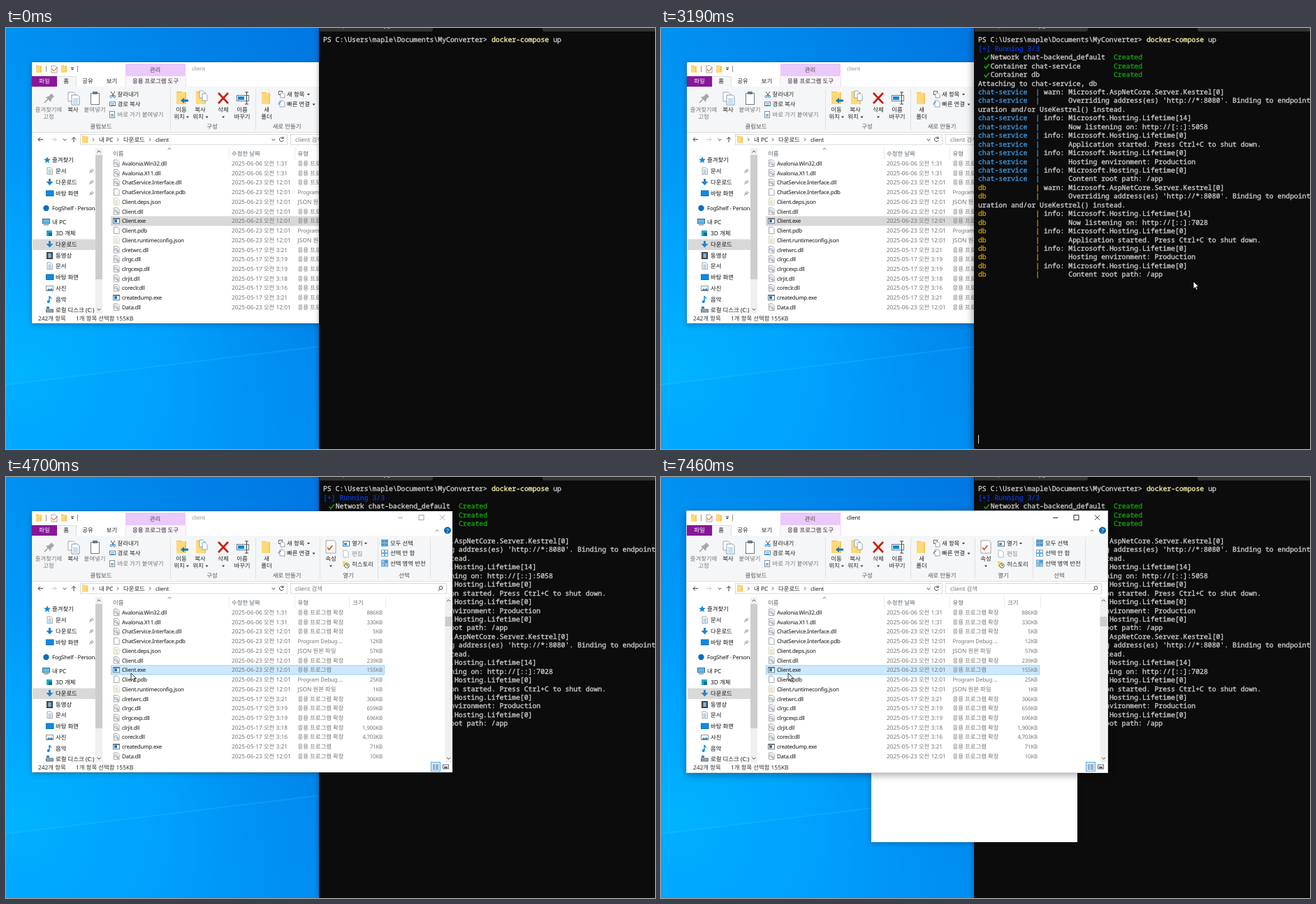
An HTML page for the animation above (8 s loop, 929 by 603 pixels).

```html
<!DOCTYPE html>
<html lang="ko">
<head>
<meta charset="utf-8">
<style>
html,body{margin:0;width:100%;height:100%;overflow:hidden}
#stage{position:relative;width:929px;height:603px;overflow:hidden;background:#0a8ff0}
#stage>*{position:absolute}
svg{display:block;position:absolute;left:0;top:0}
text{white-space:pre;text-rendering:geometricPrecision}
.k,.l{font-family:'Noto Sans','Noto Sans CJK KR',sans-serif;font-size:8.4px}
.l{font-size:7.9px;letter-spacing:-.2px}
.m{font:9.797px 'Noto Sans Mono','DejaVu Sans Mono',monospace;fill:currentColor;stroke:currentColor;stroke-width:.35px}
</style>
</head>
<body>
<div id="stage"></div>
<script>
const stage = document.getElementById('stage');

// ---- drawing helpers: each returns SVG markup ----
const rect = (x, y, w, h, fill, stroke = 'none') =>
  `<rect x="${x}" y="${y}" width="${w}" height="${h}" fill="${fill}" stroke="${stroke}"/>`;
const path = (d, stroke = '#444', w = 1, fill = 'none') =>
  `<path d="${d}" stroke="${stroke}" stroke-width="${w}" fill="${fill}"/>`;
const disc = (x, y, r, fill, stroke = 'none') =>
  `<circle cx="${x}" cy="${y}" r="${r}" fill="${fill}" stroke="${stroke}"/>`;
const text = (x, y, s, fill = '#222', cls = 'k', anchor = 'start') =>
  `<text x="${x}" y="${y + 3}" fill="${fill}" class="${cls}" text-anchor="${anchor}">${s}</text>`;
const mid = (x, y, s, fill) => text(x, y, s, fill, 'k', 'middle');
const group = (id, body) => `<g id="${id}">${body}</g>`;
const clip = (id, x, y, w, h, body) =>
  `<clipPath id="${id}">${rect(x, y, w, h, '#000')}</clipPath><g clip-path="url(#${id})">${body}</g>`;

const folder = (x, y, w = 8, h = 10) =>
  rect(x, y, w * .55, h, '#f2bd45') + rect(x, y + 1, w, h - 1, '#ffd978') + rect(x + w - 2, y + 1, 2, h - 1, '#f6c85a');
const page = (x, y, w = 8, h = 10, line = '#8a8f96') =>
  path(`M${x} ${y}h${w - 2.5}l2.5 2.5v${h - 2.5}h${-w}z`, line, .8, '#fff');
const down = (x, y) => path(`M${x - 2} ${y - 1}h4l-2 2.4z`, 'none', 0, '#333');
const chev = (x, y, dir = 1, c = '#444') => path(`M${x - 2.4} ${y - 1.2 * dir}l2.4 ${2.4 * dir} 2.4 ${-2.4 * dir}`, c);
const next = x => path(`M${x - 1} 157.5l2 2.2-2 2.2`, '#555');
const tick = (x, y, c, w = 1.3) => path(`M${x} ${y}l2.5 3 5-6`, c, w);
const lines = (x, y, w, n, c) => Array.from({length: n}, (_, i) => rect(x, y + 2 * i, w, .8, c)).join('');

function layer(id, x, y, w, h, body) {
  const d = document.createElement('div');
  d.id = id;
  d.style.cssText = `left:${x}px;top:${y}px;width:${w}px;height:${h}px`;
  d.innerHTML = `<svg width="${w}" height="${h}" viewBox="${x} ${y} ${w} ${h}">${body}</svg>`;
  stage.append(d);
  return d;
}
const $ = id => document.getElementById(id);
const show = (id, on) => $(id).style.display = on ? '' : 'none';

// ---- desktop ----
layer('desk', 0, 0, 929, 603, `
<linearGradient id="sky" x1="0" y1=".2" x2=".52" y2="0"><stop stop-color="#0096f4"/><stop offset="1" stop-color="#0074e0"/></linearGradient>
<radialGradient id="glow" gradientUnits="userSpaceOnUse" cx="20" cy="500" r="430"><stop stop-color="#00b4ff"/><stop offset=".5" stop-color="#00a6ff" stop-opacity=".75"/><stop offset="1" stop-color="#0090f5" stop-opacity="0"/></radialGradient>
${rect(0, 0, 929, 603, 'url(#sky)')}${rect(0, 0, 929, 603, 'url(#glow)')}
${path('M0 511L449 456V603H0z', 'none', 0, 'rgba(0,150,255,.16)')}${path('M0 511L449 456', 'rgba(120,215,255,.16)', 1.5)}`);

// ---- file window ----
const gray = '#777';
const rowY = i => 194 + 13.73 * i;
const kinds = {dll: '응용 프로그램 확장', pdb: 'Program Debug ...', json: 'JSON 원본 파일', exe: '응용 프로그램'};
const files = `Avalonia.Win32.dll 06-06 1:31 886
Avalonia.X11.dll 06-06 1:31 330
ChatService.Interface.dll 06-23 12:01 5
ChatService.Interface.pdb 06-23 12:01 12
Client.deps.json 06-23 12:01 57
Client.dll 06-23 12:01 239
Client.exe 06-23 12:01 155
Client.pdb 06-23 12:01 25
Client.runtimeconfig.json 06-23 12:01 1
clretwrc.dll 05-17 3:21 306
clrgc.dll 05-17 3:19 659
clrgcexp.dll 05-17 3:19 696
clrjit.dll 05-17 3:18 1,900
coreclr.dll 05-17 3:16 4,703
createdump.exe 05-17 3:21 71
Data.dll 06-23 12:01 10`.split('\n').map(s => s.split(' '));

function fileIcon(ext, y) {
  if (ext === 'exe') return rect(153.5, y - 3.5, 9, 7, '#fff', '#777') + rect(155, y - 2, 4, 4, '#0a78d4') + rect(153, y - 4, 10, 1.5, '#666');
  let s = page(154.5, y - 5, 7.5, 9.5, ext === 'json' ? '#c8bfa5' : '#8a8f96');
  if (ext === 'json') s += lines(156, y - 2, 4, 3, '#cbb98a');
  if (ext === 'dll') s += disc(157.5, y - .5, 1.7, '#fff', '#8c959e') + disc(160, y + 2, 1, '#fff', '#8c959e');
  return s;
}
const fileRow = ([name, day, time, size], i) => {
  const y = rowY(i), ext = name.split('.').pop();
  return fileIcon(ext, y) + text(166, y, name, '#111', 'l') + text(323, y, `2025-${day} 오전 ${time}`, gray) +
    text(417.5, y, kinds[ext], gray, ext === 'pdb' ? 'l' : 'k') + text(539, y, size + 'KB', gray, 'l', 'end');
};

const blue = '#1688d8';
const navIcon = {
  star: y => path(`M59 ${y - 5}l1.4 3.4 3.6.3-2.8 2.3.9 3.6-3.1-2-3.1 2 .9-3.6-2.8-2.3 3.6-.3z`, 'none', 0, blue),
  doc: y => page(59, y - 5, 7.5, 9.5) + lines(60.5, y - 2, 4.5, 3, '#4a94c8'),
  down: y => path(`M61 ${y - 5}h3v4h3.5l-5 5.5-5-5.5h3.5z`, 'none', 0, '#2583c9'),
  desk: y => rect(57.5, y - 4, 10.5, 7.5, '#0a8be8', '#0870bd'),
  cloud: y => disc(57.5, y, 4.2, '#0a6fc2'),
  pc: y => rect(52.5, y - 4.5, 10, 6.5, '#58bdf0', '#4d6b80') + rect(54, y + 3.5, 7, 1, '#4d6b80'),
  cube: y => rect(58, y - 4, 8, 8, '#25a8c8') + rect(61, y - 1, 5, 5, '#0c6f9c'),
  film: y => rect(58.5, y - 4.5, 8, 9, '#4c5c6c', '#333') + rect(60.5, y - 3, 4, 6, '#86b6d8'),
  photo: y => rect(57.5, y - 3.5, 10, 7, '#fff', '#8a99a5') + path(`M58 ${y + 3}l3-3 2 1.5 2-2 2.5 3.5z`, 'none', 0, '#3485b5'),
  note: y => path(`M62 ${y + 3}v-8q1 2 3 3.5`, '#0a86e0', 1.4) + disc(60.7, y + 3, 1.9, '#0a86e0'),
  disk: y => rect(57.5, y - 1, 10, 4, '#9aa5ad', '#66727a') + rect(58, y - 5, 4, 3, blue)
};
const nav = [['star', 189, '즐겨찾기', 1], ['doc', 205, '문서'], ['down', 221, '다운로드'], ['desk', 237, '바탕 화면'],
  ['cloud', 258, 'FogShelf - Personal', 1], ['pc', 278, '내 PC', 1], ['cube', 294, '3D 개체'], ['down', 310, '다운로드'],
  ['film', 326, '동영상'], ['doc', 341, '문서'], ['desk', 357, '바탕 화면'], ['photo', 373, '사진'], ['note', 389, '음악'], ['disk', 404, '로컬 디스크 (C:)']]
  .map(([i, y, s, top]) => navIcon[i](y) + text(top ? 66 : 71, y, s, '#111', i === 'cloud' ? 'l' : 'k')).join('');
const pushpins = [205, 221, 237].map(y => path(`M119 ${y + 3}l2.5-2.5m-1.5-1.5l3 3m-1.5-3.2l2 2 1.5-2-1.5-1.5z`, '#888', 1)).join('');

const caption = (x, y) => path(`M${x - 3.5} ${y + .5}h7M${x + 26.5} ${y - 3.5}h7v7h-7zM${x + 56.5} ${y - 3.5}l7 7m0-7l-7 7`, 'currentColor', .9);

const titleBar = rect(37, 49, 602, 36, '#fff') + folder(43, 53.5) + rect(57, 54, .8, 9, '#777') +
  page(65, 54) + tick(66, 59, '#c33d1c', 1) + folder(79, 53.5) + down(95, 59) + rect(92.8, 56, 4.4, .8, '#333') + rect(102, 54, .8, 9, '#777') +
  rect(171, 51, 86, 18, '#ebc9fb') + mid(213.5, 59.5, '관리', '#444') +
  `<g id="title">${text(266, 58, 'client', 'currentColor', 'l')}${caption(564.5, 58)}</g>` +
  rect(171, 69, 86, 15, '#fbf5fd') + rect(170.5, 69, .7, 15, '#e3d5e8') + rect(257, 69, .7, 15, '#e3d5e8') +
  rect(37, 69, 36, 15, '#881798') + mid(55, 76, '파일', '#fff') + rect(73.5, 69.5, 27, 16, '#f5f6f7', '#dddee0') +
  mid(86, 76, '홈') + mid(117, 76, '공유') + mid(151.5, 76, '보기') + mid(214, 76, '응용 프로그램 도구') +
  chev(617, 77, -1, '#777') + disc(632, 76.5, 5, '#0a67b5') + mid(632, 76.5, '?', '#fff');

const ribbon = rect(37, 84, 602, 65, '#f5f6f7') + rect(37, 149, 602, .8, '#d5d7d9') +
  [235, 357, 449, 532, 607].map(x => rect(x, 87, .8, 59, '#dcdddf')).join('') +
  [[136, '클립보드'], [295, '구성'], [402, '새로 만들기'], [490, '열기'], [570, '선택']].map(([x, s]) => mid(x, 141, s, '#555')).join('') +
  path('M55 107l5-5', '#8d949a', 1.3) + path('M57 99l7 7 1-4 4-4-4-4-4 4z', 'none', 0, '#a2a8ad') +
  mid(61, 117, '즐겨찾기에', gray) + mid(61, 127, '고정', gray) +
  page(89, 92, 10, 13) + page(94, 96, 11, 14, '#5b88ad') + lines(96, 101, 7, 4, '#7fb2d8') + mid(96, 117, '복사') +
  rect(121.5, 93.5, 12, 16, '#fff', '#6d7c88') + rect(124, 91, 7, 4, '#6d7c88') + mid(127, 117, '붙여넣기', gray) +
  path('M150 91l4 6m2-6l-4 6', '#555') + disc(150.5, 98, 1.5, 'none', blue) + disc(155, 98, 1.5, 'none', blue) + text(159.5, 95, '잘라내기') +
  rect(148.5, 106, 8, 5.5, '#fff', '#57809c') + lines(150, 108, 5, 2, blue) + text(159.5, 109, '경로 복사') +
  rect(148.5, 119.5, 7, 9, '#fff', '#7e8e9a') + rect(150, 123, 4, 4, '#91b6d0') + text(159.5, 123.5, '바로 가기 붙여넣기', gray) +
  folder(244, 91, 14, 18) + path('M250 104l5-4v2.5h6v3h-6v2.5z', 'none', 0, '#1577c2') + mid(251, 117, '이동') + mid(248, 127, '위치') + down(260, 127.5) +
  folder(272, 91, 14, 18) + page(277, 90, 7, 10, '#6b98b8') + page(281, 94, 7, 10, '#6b98b8') + mid(278, 117, '복사') + mid(275, 127, '위치') + down(287.5, 127.5) +
  path('M304 93l14 15m0-15l-14 15', '#c5200f', 2.6) + mid(311, 117, '삭제') + down(311, 127.5) +
  rect(330.5, 96.5, 17, 8, '#fff', '#62798a') + rect(332, 98, 9, 5, blue) + path('M342 92h5m-2.5 0v17m-2.5 0h5', '#444') + mid(338, 117, '이름') + mid(338, 127, '바꾸기') +
  folder(366, 92, 12, 17) + mid(373, 117, '새') + mid(373, 127, '폴더') +
  rect(390.5, 90.5, 5, 5, '#fff', '#667') + page(393, 93, 6, 7) + text(402, 95, '새 항목') + down(433, 95) +
  page(392, 104, 7, 9) + path('M390 110q0-4 4-4', blue) + text(402, 109, '빠른 연결') + down(440.5, 109.5) +
  page(458, 91, 14, 18) + tick(460, 101, '#d2561d', 1.8) + mid(465, 117, '속성') + down(465, 127.5) +
  rect(482.5, 92, 9, 7, '#fff', '#567') + rect(484, 94.5, 4, 3, blue) + text(495, 95, '열기') + down(515, 95) +
  page(483, 105, 7, 10, '#aaa') + text(495, 110, '편집', '#888') +
  folder(482, 121, 6, 7) + disc(488, 127, 3.3, '#fff', '#3a7a35') + path('M488 125v2h1.5', '#333') + text(495, 125, '히스토리') +
  [[94.5, '모두 선택', '#359be0'], [109, '선택 안 함', '#fff'], [123.5, '선택 영역 반전', '#9fd0f0']].map(([y, s, f]) =>
    [0, 1, 2, 3].map(i => rect(537.5 + i % 2 * 5, y - 4.5 + (i >> 1) * 5, 4, 4, i === 1 && f === '#9fd0f0' ? '#359be0' : f, '#6ea7d0')).join('') + text(550, y, s)).join('');

const address = path('M53 159.7h-7m3-3l-3 3 3 3', '#333') + path('M65 159.7h7m-3-3l3 3-3 3', '#c8c8c8') + chev(84, 160) + path('M97 163.5v-7m-3 3l3-3 3 3', '#333') +
  rect(106.5, 152.5, 296, 14.5, '#fff', '#d9d9d9') + folder(109, 154.5) + next(125) + text(133, 159.5, '내 PC') + next(160) +
  text(168, 159.5, '다운로드') + next(206) + text(214, 159.5, 'client', '#222', 'l') + chev(383, 160) + path('M397 158a3 3 0 1 0 .3 2.5m-.3-5v2.8h-2.7', '#444') +
  rect(407.5, 152.5, 223, 14.5, '#fff', '#d9d9d9') + text(414, 159.5, 'client 검색', gray) + disc(622.5, 158.7, 2.3, 'none', '#444') + path('M621 160.5l-2.5 2.7', '#444');

const headers = [[153, '이름'], [323, '수정한 날짜'], [417.5, '유형'], [496, '크기']].map(([x, s]) => text(x, 180, s, '#5a6675')).join('') +
  [319, 413, 491, 543].map(x => rect(x, 171, .8, 17, '#e5e5e5')).join('') + chev(234, 173, -1, '#777');

const scroll = (x, y, h) => rect(x, 172, 10, 237, '#f0f0f0') + rect(x, y, 10, h, '#cdcdcd') + chev(x + 5, 177, -1) + chev(x + 5, 403);

const explorer = layer('explorer', 37, 49, 602, 374,
  rect(37, 49, 602, 374, '#fff') + titleBar + ribbon + address + headers +
  rect(38, 302.5, 90, 15.5, '#d9d9d9') + clip('navclip', 37, 170, 91, 239, nav + pushpins) + scroll(128, 182, 178) +
  group('hover', rect(151, rowY(7) - 6.8, 391, 13.6, '#e5f3ff')) +
  `<rect id="pick" x="150.5" y="${rowY(6) - 6.4}" width="391" height="13"/>` +
  files.map(fileRow).join('') + scroll(628.5, 200, 14) +
  text(46, 415.5, '242개 항목', '#333') + text(100, 415.5, '1개 항목 선택함 155KB', '#333') +
  rect(608.5, 408.5, 13, 13, '#cce8ff', '#5cb0e8') + lines(611, 412, 3, 4, '#557') + lines(615, 412, 4, 4, '#557') +
  rect(625.5, 412, 8, 6, '#fff', '#667') + rect(627, 414.5, 5, 3, '#567'));

// ---- terminal ----
const CH = 5.878, LH = 12.44;
const at = (row, col, s, c = '#ccc') => `<text class="m" x="${454 + CH * col}" y="${17 + LH * row + 3.4}" style="color:${c}">${s}</text>`;
const log = (name, color, port, top) => {
  const msg = ['warn: Microsoft.AspNetCore.Server.Kestrel[0]', "      Overriding address(es) 'http://*:8080'. Binding to endpoints",
    null, 'info: Microsoft.Hosting.Lifetime[14]', `      Now listening on: http://[::]:${port}`, 'info: Microsoft.Hosting.Lifetime[0]',
    '      Application started. Press Ctrl+C to shut down.', 'info: Microsoft.Hosting.Lifetime[0]', '      Hosting environment: Production',
    'info: Microsoft.Hosting.Lifetime[0]', '      Content root path: /app'];
  return msg.map((s, i) => s === null ? at(top + i, 0, 'uration and/or UseKestrel() instead.')
    : at(top + i, 0, name, color) + at(top + i, 14, '|', color) + at(top + i, 16, s));
};
const made = (row, s) => tick(462.5, 17 + LH * row + .3, '#13a10e', 1.7) + at(row, 3, s) + at(row, 33, 'Created', '#13a10e');
const rows = [
  at(0, 0, 'PS C:\\Users\\maple\\Documents\\MyConverter&gt;') + at(0, 41, 'docker-compose', '#f9f1a5') + at(0, 56, 'up'),
  at(1, 0, '[+] Running 3/3', '#0037da'),
  made(2, 'Network chat-backend_default'), made(3, 'Container chat-service'), made(4, 'Container db'),
  at(5, 0, 'Attaching to chat-service, db'),
  ...log('chat-service', '#3a96dd', 5058, 6), ...log('db', '#c19c00', 7028, 17)];

const terminal = layer('terminal', 448, 0, 481, 603,
  rect(448, 0, 481, 603, '#0c0c0c') + path('M449 0h162v2q0 3-3 3H449z', 'none', 0, '#333') + path('M768 0h161v5H771q-3 0-3-3z', 'none', 0, '#333') +
  text(482, -4, 'p', '#ccc') + text(541, -4, 'yg', '#ccc') +
  rows.map((s, i) => group('row' + i, s)).join('') + group('caret', rect(0, 0, 1, 12.4, '#ddd')));

// ---- opened window ----
const client = layer('client', 301, 110, 295, 413,
  group('body', rect(301, 110, 295, 413, '#fff')) +
  rect(301, 110, 295, 20, '#fff') + disc(312, 120, 3, '#666') + text(320, 119.5, 'Client', '#111', 'l') +
  `<g style="color:#111">${caption(520.5, 119.5)}</g>` +
  group('edge', rect(300.5, 109.5, 295, 413, 'none', 'rgba(50,50,50,.8)')));

const pointer = layer('pointer', -1, -1, 12, 16, path('M0 0v10.6l2.5-2.3 1.8 3.9 1.8-.8-1.8-3.8h3.4z', '#000', .8, '#fff'));
pointer.style.zIndex = 9;

// ---- timeline ----
const LOOP = 8000;
// time -> number of printed rows
const printed = [[0, 1], [1720, 3], [1790, 5], [1860, 6], [2520, 9], [2590, 12], [2720, 15], [2790, 17], [2930, 20], [3000, 22], [3070, 24], [3130, 26], [3190, 28]];
// time -> caret row, column; row -1 is off
const carets = [[0, -1], [530, 0, 58], [1060, -1], [1520, 1, 0], [1720, -1], [1860, 6, 0], [2120, -1], [2590, 46, 0], [3260, 28, 0], [4360, -1]];
const moves = [[110, 907, 420], [350, 820, 375], [600, 775, 360], [2320, 769, 360], [2520, 769, 360], [2720, 762, 363], [3190, 762, 363], [3260, 768, 360],
  [3500, 690, 170], [3680, 570, 94], [3900, 450, 190], [4100, 394, 277], [4160, 330, 291], [4360, 230, 279], [4430, 179, 281], [6650, 179, 281], [6790, 182, 281]];
const last = (table, t) => table.filter(r => r[0] <= t).pop();

function pointerAt(t) {
  const i = moves.findIndex(m => m[0] > t);
  if (i < 1) return moves[i < 0 ? moves.length - 1 : 0].slice(1);
  const [a, b] = [moves[i - 1], moves[i]], k = (t - a[0]) / (b[0] - a[0]);
  return [1, 2].map(j => a[j] + (b[j] - a[j]) * k);
}

const RAISED = '0 3px 11px rgba(0,0,0,.4)', RESTING = '0 2px 7px rgba(0,0,0,.25)';

function draw(t) {
  const n = last(printed, t)[1];
  rows.forEach((_, i) => show('row' + i, i < n));
  const [, row, col] = last(carets, t);
  show('caret', row >= 0);
  if (row >= 0) $('caret').setAttribute('transform', `translate(${Math.round(454 + CH * col)} ${10.6 + LH * row})`);

  const raised = t >= 4630, active = (t >= 4770 && t < 6050) || t >= 6930;
  explorer.style.zIndex = t >= 6930 ? 4 : raised ? 2 : 0;
  terminal.style.zIndex = 1;
  client.style.zIndex = 3;
  explorer.style.boxShadow = active ? '0 0 0 1px #d4dade,' + RAISED : '0 0 0 .5px rgba(40,70,100,.5),' + RESTING;
  terminal.style.boxShadow = t >= 110 && t < 4630 ? '0 0 11px rgba(0,0,0,.5)' : '0 0 7px rgba(0,0,0,.35)';
  $('title').style.color = active ? '#111' : '#999';

  const picked = t >= 4360;
  $('pick').setAttribute('fill', picked ? '#cde8ff' : '#d9d9d9');
  $('pick').setAttribute('stroke', picked ? '#99d1ff' : '#d9d9d9');
  show('hover', t >= 4160 && t < 4360);

  client.style.display = t >= 5980 ? '' : 'none';
  $('body').style.opacity = t < 6050 ? 0 : t < 6120 ? .6 : 1;
  show('edge', t < 6120);
  client.style.boxShadow = t >= 6120 && t < 6930 ? RAISED : RESTING;

  const [x, y] = pointerAt(t);
  pointer.style.transform = `translate(${x}px,${y}px)`;
  pointer.style.display = t < 110 || (t >= 1520 && t < 2320) ? 'none' : '';
}

const start = performance.now();
function tickFrame() {
  draw((performance.now() - start) % LOOP);
  requestAnimationFrame(tickFrame);
}
draw(0);
requestAnimationFrame(tickFrame);
</script>
</body>
</html>
```
